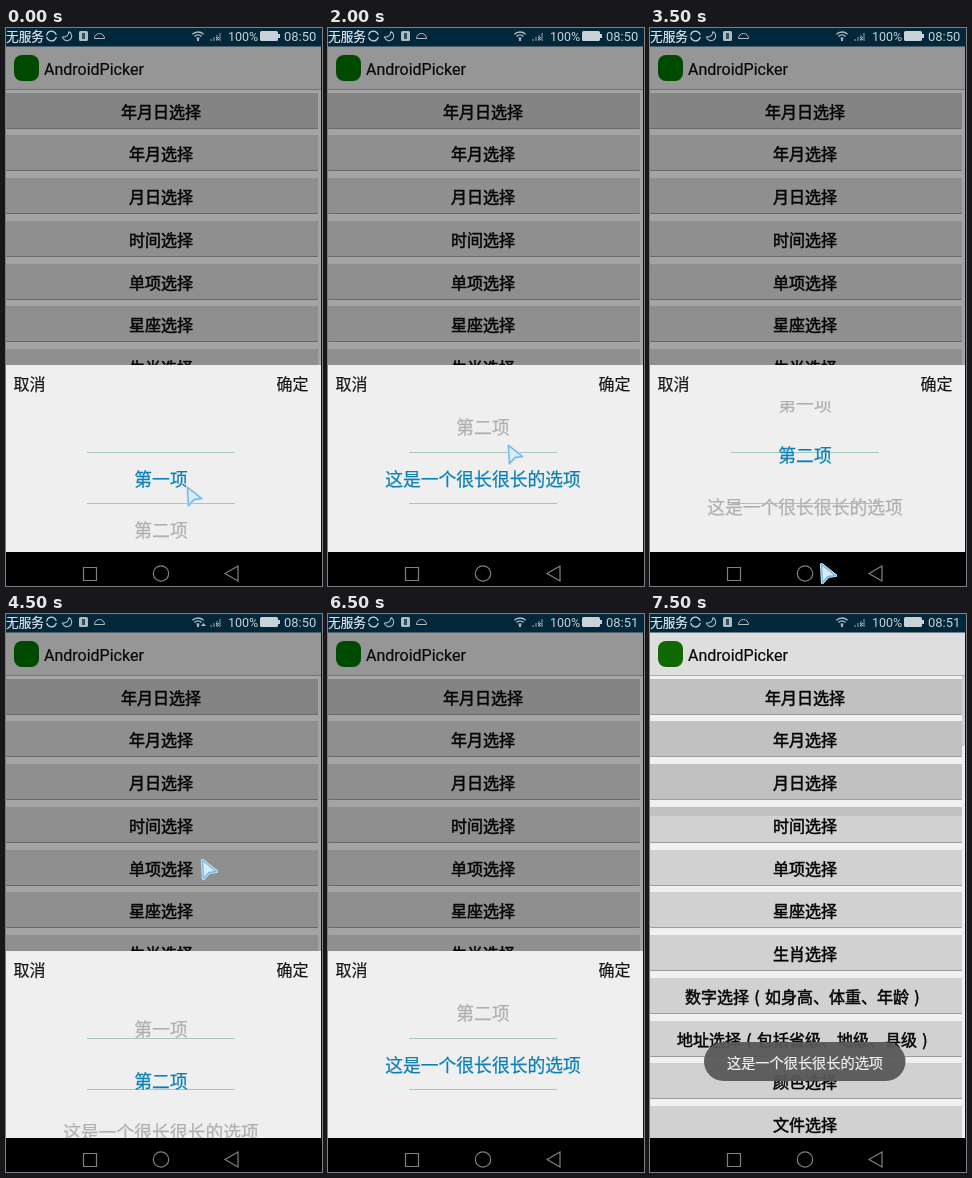
Recreate the animation shown at these times as an HTML page with a canvas. Size 316 by 558 pixels, loop 8000 ms.

```html
<!DOCTYPE html>
<html lang="zh-CN">
<head>
<meta charset="utf-8">
<style>
  html, body { margin: 0; width: 100%; height: 100%; overflow: hidden; background: #000; }
  canvas { display: block; }
</style>
</head>
<body>
<canvas width="316" height="558"></canvas>
<script>
const ctx = document.querySelector('canvas').getContext('2d');
const CJK = '"Noto Sans CJK SC", "Noto Sans CJK", sans-serif';
const LATIN = 'Roboto, sans-serif';
const STEP = 500, LOOP = 8000;
const PITCH = 51.4, CENTER = 451;

// Brackets centred in a full-width cell.
const bracket = s => `\u2004(\u2004${s}\u2004)\u2004`;
const rows = ['年月日选择', '年月选择', '月日选择', '时间选择', '单项选择', '星座选择', '生肖选择',
  '数字选择' + bracket('如身高、体重、年龄'), '地址选择' + bracket('包括省级、地级、县级'),
  '颜色选择', '文件选择'];
const items = ['第一项', '第二项', '这是一个很长很长的选项'];

// Per step: y of the first wheel item, then the pointer position.
const steps = [
  [451, 180, 458], [451, 179, 397], [393, 180, 390], [399.6, 180, 440],
  [348.2, 179, 416], [348.2, 168, 448], [348.2, 71, 402], [376, 170, 535],
  [451, 190, 440], [415.6, 195, 245], [348.2, 152, 398], [348.2, 172, 362],
  [348.2, 278, 365], [348.2]
];

function rect(x, y, w, h, color) {
  ctx.fillStyle = color;
  ctx.fillRect(x, y, w, h);
}

function round(x, y, w, h, r, color) {
  ctx.fillStyle = color;
  ctx.beginPath();
  ctx.roundRect(x, y, w, h, r);
  ctx.fill();
}

function text(str, x, y, size, color, { align = 'center', font = CJK, bold = 0 } = {}) {
  ctx.font = `${size}px ${font}`;
  ctx.textAlign = align;
  ctx.fillStyle = ctx.strokeStyle = color;
  ctx.lineWidth = bold;
  ctx.fillText(str, x, y + size * 0.38);
  if (bold) ctx.strokeText(str, x, y + size * 0.38);
}

function stroke(color, width, draw) {
  ctx.strokeStyle = color;
  ctx.lineWidth = width;
  ctx.beginPath();
  draw();
  ctx.stroke();
}

function poly(...pts) {
  for (let i = 0; i < pts.length; i += 2) ctx.lineTo(pts[i], pts[i + 1]);
  ctx.closePath();
}

function statusBar(n) {
  const ink = '#aebbc2', bright = '#c9d2d7';
  const latin = { align: 'left', font: LATIN };
  rect(0, 0, 316, 18, '#02263a');
  rect(0, 18, 316, 1, 'rgba(2,38,58,.5)');
  text('无服务', 0, 8, 12.7, '#e6ebee', { align: 'left', bold: 0.2 });
  stroke(bright, 1.3, () => {
    ctx.arc(45.5, 8, 4.9, 0.2, 2.9);
    ctx.moveTo(40.8, 6.6);
    ctx.arc(45.5, 8, 4.9, 3.43, 6.05);
  });
  stroke(ink, 1.1, () => {
    ctx.arc(61, 8, 4.7, -1.2, 2.9);
    ctx.quadraticCurveTo(63, 9, 62.7, 3.6);
  });
  round(73, 3, 9, 10, 1.5, ink);
  rect(76, 5, 3, 6, '#33505f');
  stroke(ink, 1, () => {
    ctx.moveTo(88.5, 10.5);
    ctx.arc(93.5, 10.5, 5, Math.PI, 0);
    ctx.closePath();
  });
  for (const r of [2, 5, 8])
    stroke(ink, 1.4, () => ctx.arc(192, 12, r, -2.35, -0.8));
  rect(191, 11, 2, 2, ink);
  if (n === 8 || n === 9) {
    ctx.fillStyle = ink;
    ctx.beginPath();
    poly(195, 12, 200, 12, 197.5, 9);
    ctx.fill();
  }
  for (let i = 0; i < 4; i++) rect(204 + i * 3, 11 - i * 2, 2, 2 + i * 2, '#50656f');
  stroke(ink, 1, () => {
    ctx.moveTo(210, 9); ctx.lineTo(213, 12);
    ctx.moveTo(213, 9); ctx.lineTo(210, 12);
  });
  text('100%', 222, 8, 12.5, bright, latin);
  round(254, 3, 18, 10, 1.5, bright);
  rect(272, 6, 2, 4, bright);
  text(n < 11 ? '08:50' : '08:51', 278, 8, 13, bright, latin);
}

function page(dim) {
  rect(0, 18, 316, 506, dim ? '#a4a4a4' : '#f0f0f0');
  rows.forEach((label, i) => {
    const y = Math.floor(65 + i * 42.75);
    const shaded = dim ? i === 0 : i < 3;
    const face = dim ? (shaded ? '#848484' : '#8f8f8f') : (shaded ? '#c1c1c1' : '#d1d1d1');
    round(0, y, 312, 36, 1, dim ? '#696969' : '#9c9c9c');
    round(0, y, 312, 35, 1, face);
    if (!dim && i === 3) rect(0, y, 312, 9, '#c1c1c1');
    text(label, 155, 83.5 + i * 42.75, 16, '#050505', { bold: 0.5 });
  });
  rect(0, 18, 316, 43, dim ? '#969696' : '#dedede');
  rect(0, 61, 316, 1, dim ? '#737373' : '#ababab');
  round(8, 27, 25, 26, 8, dim ? '#004a00' : '#0f6800');
  text('AndroidPicker', 38, 40.5, 16, '#080808', { align: 'left', font: LATIN, bold: 0.2 });
  if (!dim) rect(312, 62, 3, 70, '#d0d0d0');
  rect(315, 18, 1, 506, '#111');
}

function picker(first) {
  rect(0, 337, 315, 187, '#efefef');
  text('取消', 7.5, 356, 16, '#181818', { align: 'left', bold: 0.2 });
  text('确定', 302.5, 356, 16, '#181818', { align: 'right', bold: 0.2 });
  ctx.save();
  ctx.beginPath();
  ctx.rect(0, 373, 315, 151);
  ctx.clip();
  for (const y of [424, 475]) rect(81, y, 148, 1, '#a5c6c0');
  items.forEach((label, i) => {
    const y = first + i * PITCH;
    const selected = Math.abs(y - CENTER) < PITCH / 2;
    text(label, 155, y, 17.8, selected ? '#0b80b6' : '#b0b0b0', { bold: 0.25 });
  });
  ctx.restore();
}

function navBar() {
  rect(0, 524, 316, 34, '#000');
  stroke('#808080', 1.2, () => ctx.rect(77.5, 539.5, 13, 13));
  stroke('#808080', 1.2, () => ctx.arc(155, 545.5, 7.7, 0, 7));
  stroke('#808080', 1.2, () => poly(219, 545.5, 232, 538, 232, 553));
}

function toast() {
  round(54, 428, 201.5, 39, 19.5, 'rgba(88,88,88,.94)');
  text(items[2], 155, 448.5, 14.2, '#f4f4f4', { bold: 0.2 });
}

function pointer(x, y) {
  const arrow = () => poly(1.5, 1.5, 15.5, 12.5, 8, 13.5, 2.5, 19.5);
  ctx.save();
  ctx.translate(x, y);
  ctx.lineJoin = 'round';
  ctx.fillStyle = '#d9edf9';
  stroke('#cfe8f8', 3.2, arrow);
  ctx.fill();
  stroke('#74b6e2', 1.4, arrow);
  ctx.restore();
}

function draw(n) {
  const [first, px, py] = steps[n] || [];
  page(n < 14);
  statusBar(n);
  if (n < 14) picker(first);
  navBar();
  if (n === 15) toast();
  if (px) pointer(px, py);
}

function tick() {
  draw(Math.floor(performance.now() % LOOP / STEP));
  requestAnimationFrame(tick);
}
tick();
</script>
</body>
</html>
```
